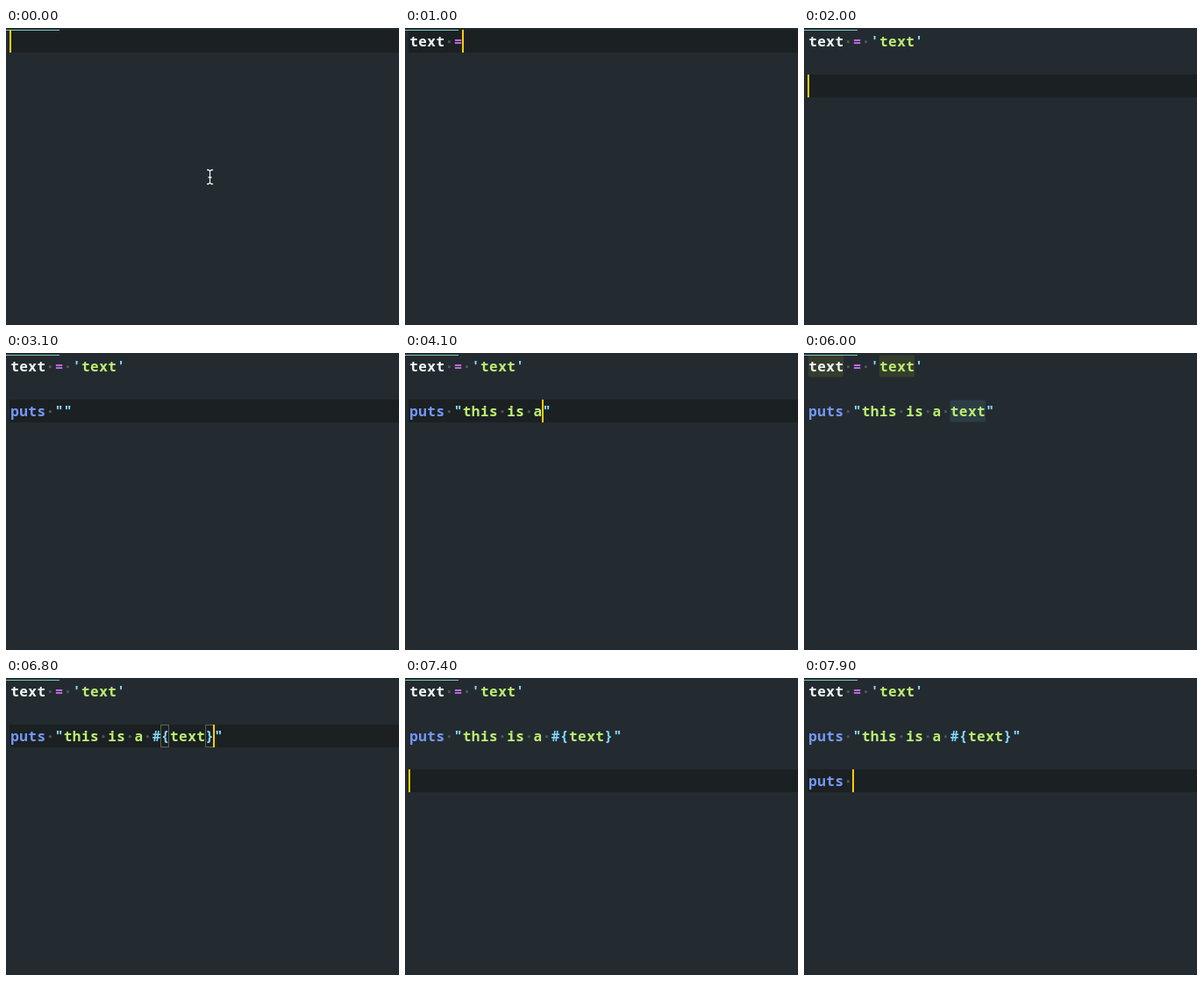
Animation of 448x338 px, one loop 8000 ms. Source, as an HTML page with a canvas:

```html
<!DOCTYPE html>
<html lang="en">
<head>
<meta charset="utf-8">
<title>Editor typing</title>
<style>
html, body { margin: 0; width: 100%; height: 100%; overflow: hidden; background: #232b30; }
canvas { display: block; width: 448px; height: 338px; }
</style>
</head>
<body>
<canvas id="stage" width="448" height="338"></canvas>
<script>
const ctx = document.getElementById('stage').getContext('2d');
const LOOP = 8000, STEP = 100;
const CELL = 10.1, ROW = 25.5, LEFT = 4.9, TOP = 2, BASELINE = 19;
const FONT = '600 16px "Noto Sans Mono", "DejaVu Sans Mono", monospace';
const COLOR = {
  back: '#232b30', active: '#1b2023', caret: '#ffcc00', plain: '#f0f7f7',
  operator: '#c06ce2', punct: '#84d8fb', string: '#bdee72', call: '#7599f8',
  dot: '#4b575d', match: '#353d2d', selected: '#2d3d46', bracket: '#5c6350',
  tab: '#7cc9bd'
};

// Each run of keys starts at its time and goes on one key per step.
const RUNS = [
  [400, 'tex'], [800, "t = 'text"], [1700, "'\n\n"], [2100, 'puts '],
  [2700, '"'], [3400, 't'], [3400, 'his is a'], [4300, ' text'],
  [6900, '"'], [7100, '\n\n'], [7500, 'puts ']
];
const BLINKS = [[100, 300], [3100, 3200], [4900, 5100]];
const SELECT = 5400, WRAP = 6200, DESELECT = 6400, STEP_OUT = 6600, LEAVE = 6900;

const actions = RUNS.flatMap(([at, keys]) =>
  [...keys].map((key, i) => ({ at: at + i * STEP, run: doc => press(doc, key) })));
actions.push(
  { at: WRAP, run: doc => {
    doc.lines[2] = doc.lines[2].replace('text"', '#{text}"');
    doc.col = 22;
  } },
  { at: STEP_OUT, run: doc => { doc.col = 23; } }
);
actions.sort((a, b) => a.at - b.at);

const within = (t, from, to) => t >= from && t < to;
const cellX = col => LEFT + col * CELL;
const rowY = row => TOP + row * ROW;

function press(doc, key) {
  const last = doc.lines.length - 1;
  const line = doc.lines[last];
  if (key === '\n') {
    doc.lines.push('');
    doc.col = 0;
    return;
  }
  const isQuote = key === "'" || key === '"';
  if (!isQuote || line[doc.col] !== key) {
    const added = isQuote ? key + key : key;
    doc.lines[last] = line.slice(0, doc.col) + added + line.slice(doc.col);
  }
  doc.col++;
}

function documentAt(t) {
  const doc = { lines: [''], col: 0 };
  for (const action of actions) if (action.at <= t) action.run(doc);
  return doc;
}

function fillCells(row, col, count, color) {
  ctx.fillStyle = color;
  ctx.beginPath();
  ctx.roundRect(cellX(col), rowY(row) + 0.5, count * CELL, ROW - 0.5, 2);
  ctx.fill();
}

function drawLine(line, row) {
  const y = rowY(row) + BASELINE;
  const callEnd = line.startsWith('puts') ? 4 : 0;
  let quoted = false;
  [...line].forEach((ch, col) => {
    const x = cellX(col) + CELL / 2;
    if (ch === ' ') {
      ctx.fillStyle = COLOR.dot;
      ctx.beginPath();
      ctx.arc(x, y - 5.3, 1.6, 0, Math.PI * 2);
      ctx.fill();
      return;
    }
    let color = quoted ? COLOR.string : COLOR.plain;
    if (ch === "'" || ch === '"') {
      quoted = !quoted;
      color = COLOR.punct;
    } else if (quoted && '#{}'.includes(ch)) color = COLOR.punct;
    else if (ch === '=') color = COLOR.operator;
    else if (col < callEnd) color = COLOR.call;
    ctx.fillStyle = color;
    ctx.fillText(ch, x, y);
  });
}

function drawPointer(x, y) {
  const beam = new Path2D(
    `M${x - 3.5} ${y - 8}H${x - 1.5}L${x} ${y - 6.5}L${x + 1.5} ${y - 8}H${x + 3.5}` +
    `M${x} ${y - 6.5}V${y + 6.5}` +
    `M${x - 3.5} ${y + 8}H${x - 1.5}L${x} ${y + 6.5}L${x + 1.5} ${y + 8}H${x + 3.5}` +
    `M${x - 2} ${y + 0.5}H${x + 2}`);
  for (const [color, width] of [['#14191c', 2.8], ['#f4f6f6', 1.3]]) {
    ctx.strokeStyle = color;
    ctx.lineWidth = width;
    ctx.stroke(beam);
  }
}

function draw(t) {
  const { lines, col } = documentAt(t);
  const row = lines.length - 1;
  const selecting = within(t, SELECT, DESELECT);

  ctx.fillStyle = COLOR.back;
  ctx.fillRect(0, 0, 448, 338);
  if (selecting) {
    fillCells(0, 0, 4, COLOR.match);
    fillCells(0, 8, 4, COLOR.match);
    fillCells(2, t < WRAP ? 16 : 18, 4, COLOR.selected);
  } else {
    ctx.fillStyle = COLOR.active;
    ctx.fillRect(4, Math.round(rowY(row)), 444, 26);
  }
  ctx.fillStyle = COLOR.tab;
  ctx.fillRect(0, 2, 61, 1);

  if (within(t, DESELECT, LEAVE)) {
    ctx.strokeStyle = COLOR.bracket;
    ctx.lineWidth = 1;
    for (const c of [17, 22]) {
      ctx.strokeRect(Math.floor(cellX(c)) + 0.5, rowY(2) + 0.5, 9, 25);
    }
  }

  lines.forEach(drawLine);

  const hidden = BLINKS.some(([from, to]) => within(t, from, to));
  if (!selecting && !hidden) {
    ctx.fillStyle = COLOR.caret;
    ctx.fillRect(Math.round(cellX(col) - 0.9), Math.round(rowY(row)), 2, 26);
  }
  if (t < 400) drawPointer(232.5, 169.5);
}

function frame(now) {
  draw(now % LOOP);
  requestAnimationFrame(frame);
}

ctx.font = FONT;
ctx.textAlign = 'center';
requestAnimationFrame(frame);
</script>
</body>
</html>
```
